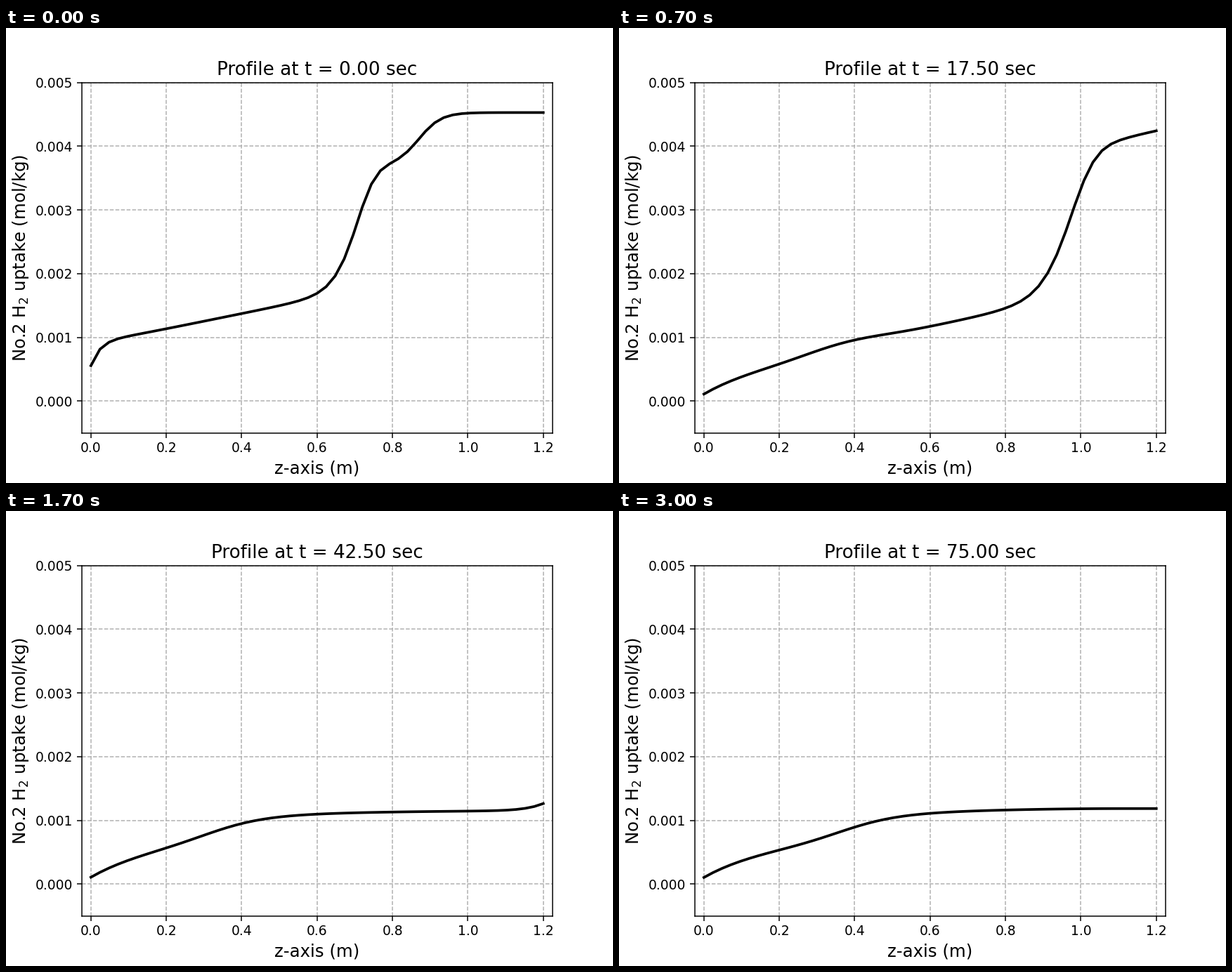
Animation, 864 px wide and 648 px high, one loop 3.1 s. Source, as a matplotlib script:

```python
import numpy as np
import matplotlib.pyplot as plt
from matplotlib.animation import FuncAnimation

FRAMES, INTERVAL = 31, 100
DT = 2.5   # simulated seconds per frame
z = np.linspace(0, 1.2, 51)


def sigmoid(x):
    return 1 / (1 + np.exp(-x))


def smoothstep(x):
    x = np.clip(x, 0, 1)
    return x * x * (3 - 2 * x)


def inlet_base(t):
    """Inlet profile: an initial dip that gives way to a slow S-curve."""
    start = 0.93 - 0.4 * np.exp(-z / 0.025)
    knee = 0.29 + 0.05 * (t / 60) ** 2
    late = 0.1 * smoothstep((t - 22.5) / 35) * smoothstep(z / 1.1)
    steady = (0.101 + 0.535 * (1 - np.exp(-z / 0.16))
              + 0.45 * sigmoid((z - knee) / 0.075) + late)
    return start + (steady - start) * smoothstep(t / (2 + 20 * z))


def ramp(t):
    """Gentle slope whose foot runs ahead through the column."""
    soft = 0.05
    return 1.2 * soft * np.log1p(np.exp((z - 0.03 - 0.028 * t) / soft))


def upper_level(t):
    """Level behind the front, with a second step that spreads out."""
    low, high = 3.7 + 0.002 * t, 4.53
    steepness = 34 / (1 + 0.22 * t)
    return low + (high - low) * sigmoid(steepness * (z - 0.87 - 0.0142 * t))


def front(t):
    """Share of the upper level reached: a skewed travelling step."""
    settle = np.exp(-t / 4)
    centre = 0.747 + 0.015 * t - 0.012 * settle
    steepness = 23 + 7 * settle
    return 1 - (1 + np.exp(steepness * (z - centre))) ** -2.2


def uptake(t):
    lower = inlet_base(t) + ramp(t)
    return 1e-3 * (lower + (upper_level(t) - lower) * front(t))


fig, ax = plt.subplots(figsize=(6.4, 4.8), dpi=135)
line, = ax.plot(z, uptake(0), color="black", linewidth=2)
title = ax.set_title("", fontsize=14)
ax.set_xlabel("z-axis (m)", fontsize=13)
ax.set_ylabel("No.2 H$_2$ uptake (mol/kg)", fontsize=13, labelpad=3.5)
ax.tick_params(axis="x", pad=3)
ax.set_xlim(-0.024, 1.224)
ax.set_ylim(-0.0005, 0.005)
ax.grid(linestyle="--")


def update(i):
    t = i * DT
    line.set_ydata(uptake(t))
    title.set_text(f"Profile at t = {t:.2f} sec")
    return line, title


anim = FuncAnimation(fig, update, frames=FRAMES, interval=INTERVAL,
                     repeat=True, repeat_delay=0)
plt.show()
```
